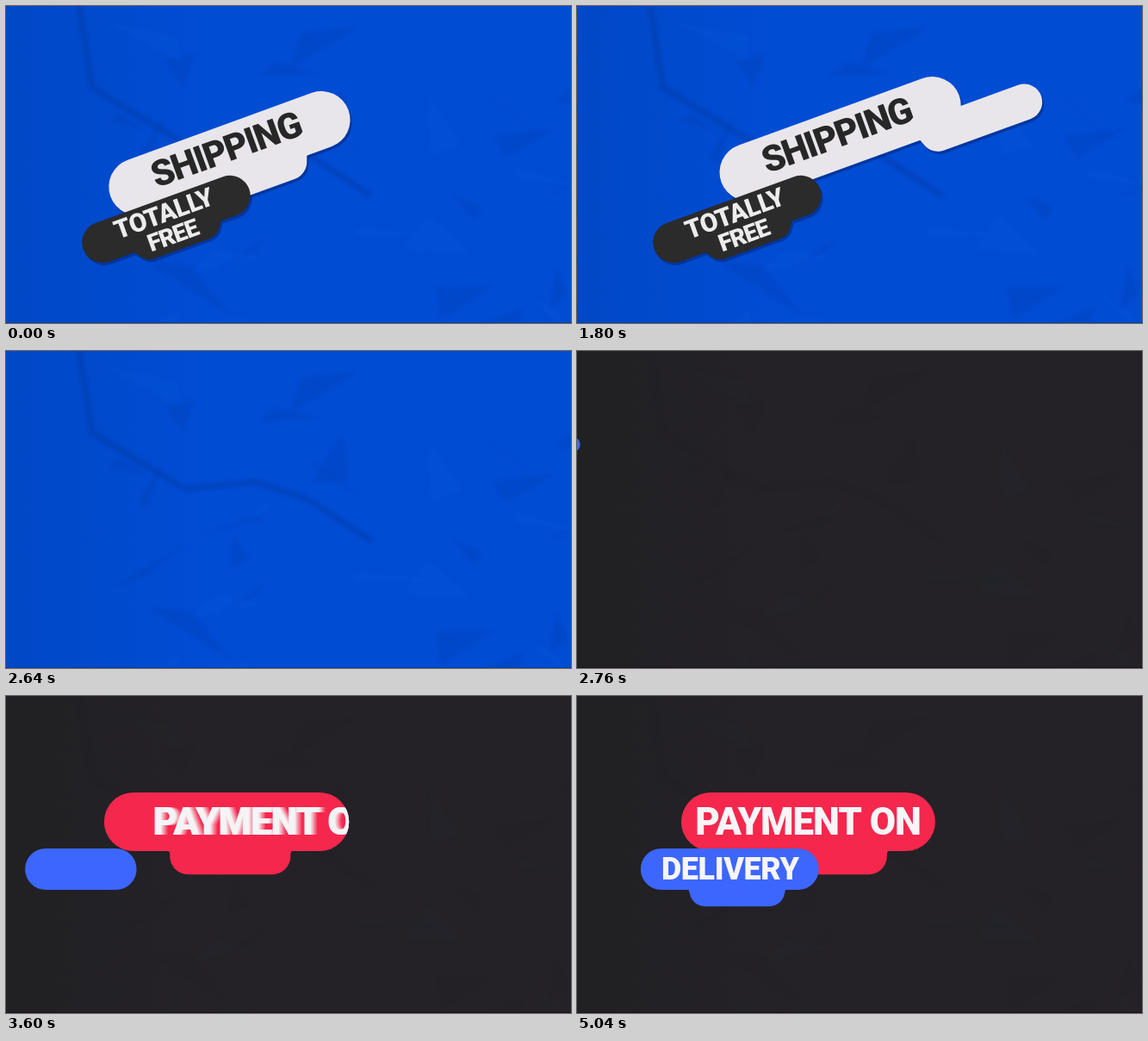
Write an HTML page with a canvas that moves like this. It is 656 px wide and 368 px high and loops after 5520 ms.

```html
<!DOCTYPE html>
<html lang="en">
<head>
<meta charset="utf-8">
<title>Shipping totally free</title>
<style>
html, body { margin: 0; width: 100%; height: 100%; overflow: hidden; background: #004bd2; }
canvas { display: block; }
</style>
</head>
<body>
<canvas id="stage" width="656" height="368"></canvas>
<script>
const W = 656, H = 368, LOOP = 5520, STEP = 120, CUT = 2760;
const RED = '#f5274d', BLUE = '#3d66ff';
const ctx = document.getElementById('stage').getContext('2d');

function seeded(seed) {
  return () => (seed = seed * 16807 % 2147483647) / 2147483647;
}

// Creased paper: faint random facets and one long fold over a gentle gradient.
function makePaper(side, middle, edge, strength) {
  const canvas = document.createElement('canvas');
  canvas.width = W;
  canvas.height = H;
  const c = canvas.getContext('2d'), random = seeded(41);
  const fade = c.createLinearGradient(0, 0, W, 0);
  fade.addColorStop(0, side);
  fade.addColorStop(.35, middle);
  fade.addColorStop(1, middle);
  c.fillStyle = fade;
  c.fillRect(0, 0, W, H);
  c.filter = 'blur(2px)';
  for (let i = 0; i < 36; i++) {
    const x = random() * W, y = random() * H;
    c.fillStyle = i % 3 ? `rgba(0,10,40,${.05 * strength})` : `rgba(40,130,255,${.06 * strength})`;
    c.beginPath();
    for (let k = 0; k < 3; k++) c.lineTo(x + random() * 110, y + random() * 80);
    c.fill();
  }
  c.strokeStyle = `rgba(0,10,40,${.13 * strength})`;
  c.lineWidth = 6;
  c.beginPath();
  for (const [x, y] of [[85, 0], [100, 95], [208, 160], [290, 152], [350, 172], [424, 220]]) c.lineTo(x, y);
  c.stroke();
  c.filter = 'none';
  c.fillStyle = edge;
  c.fillRect(0, H - 1, W, 1);
  return canvas;
}
const bluePaper = makePaper('#0048c6', '#004cd3', '#0040a8', 1);
const darkPaper = makePaper('#212023', '#242227', '#1b1017', .2);

// A pill with a rounded lobe from left to right hanging below it, joined by fillets.
function badge(x, y, w, h, left, right, bottom) {
  const path = new Path2D(), f = 5, base = y + h - 1, r = h * .18 + 9;
  path.roundRect(x, y, w, h, h / 2);
  if (right - left < 4) return path;
  path.roundRect(left, bottom - 2 * r, right - left, 2 * r, r);
  if (left - f > x + h / 2) {
    path.moveTo(left - f, base);
    path.lineTo(left + 2, base);
    path.lineTo(left + 2, base + f);
    path.lineTo(left, base + f);
    path.quadraticCurveTo(left, base, left - f, base);
  }
  if (right + f < x + w - h / 2) {
    path.moveTo(right - 2, base);
    path.lineTo(right + f, base);
    path.quadraticCurveTo(right, base, right, base + f);
    path.lineTo(right - 2, base + f);
    path.closePath();
  }
  return path;
}

function label(text, x, y, size, spacing, color) {
  ctx.font = `900 ${size}px Roboto, sans-serif`;
  ctx.letterSpacing = spacing + 'px';
  ctx.textAlign = 'center';
  ctx.fillStyle = color;
  ctx.fillText(text, x + spacing / 2, y + size * .3555);
}

// Tilted badges: the lobe slides out first, the pill follows with its text.
const tilted = [
  { x: 259.5, y: 171, w: 294, h: 66.5, start: 1500, fill: '#e8e6ea', ink: '#272727',
    lines: [['SHIPPING', -1.6, -6, 42, -1.5]] },
  { x: 186, y: 247.4, w: 205, h: 47.5, start: 1980, fill: '#2b2b2b', ink: '#ececec',
    lines: [['TOTALLY', -.4, -7.6, 30, -.4], ['FREE', 1.2, 20, 28, -1.2]] }
];

function drawTilted(b, t, shadow) {
  const age = Math.max(0, t - b.start), left = -b.w / 2, top = -b.h / 2;
  const slide = 900 * (Math.max(0, age - 150) / 480) ** 2.5;
  const lead = Math.max(slide, 66 * (age / 180) ** 2.2);
  const path = badge(left + slide, top, b.w, b.h,
    left + b.w * .275 + lead, left + b.w * .78 + lead, top + b.h * 1.31);
  ctx.save();
  ctx.translate(b.x + (shadow ? 2 : 0), b.y + (shadow ? 3 : 0));
  ctx.rotate(-Math.PI / 9);
  ctx.fillStyle = shadow ? 'rgba(0,40,130,.6)' : b.fill;
  ctx.fill(path);
  if (!shadow) {
    ctx.clip(path);
    for (const [text, x, y, size, spacing] of b.lines) label(text, x + slide, y, size, spacing, b.ink);
  }
  ctx.restore();
}

// Level badges: every part eases to its place, losing 40% of the way left per step.
const level = [
  { x: 121, y: 112, w: 295, h: 68, start: 3120, fill: RED, text: 'PAYMENT ON', size: 44, spacing: -1.1 },
  { x: 74, y: 177, w: 207, h: 48, start: 3670, fill: BLUE, text: 'DELIVERY', size: 36, spacing: -.4 }
];

function drawLevel(b, t) {
  const n = (t - b.start) / STEP;
  if (n < -2) return;
  const rest = b.w * .6 ** n;
  const path = badge(b.x - .186 * rest, b.y, Math.max(b.h, b.w - .278 * rest), b.h,
    b.x + b.w * .275 - .31 * rest, b.x + b.w * .81 - .773 * rest, b.y + b.h * 1.4);
  ctx.save();
  ctx.fillStyle = b.fill;
  ctx.fill(path);
  ctx.clip(path);
  // Averaged copies give the sliding text its motion blur.
  const offset = .966 * rest, copies = offset > 4 ? 7 : 1;
  for (let i = 0; i < copies; i++) {
    ctx.globalAlpha = 1 / (i + 1);
    const smear = copies > 1 ? (i / (copies - 1) - .5) * offset * .2 : 0;
    label(b.text, b.x + b.w / 2 + offset + smear, b.y + b.h * .49, b.size, b.spacing, '#f7f5f7');
  }
  ctx.restore();
}

function drawBars(t) {
  const n = (t - 3120) / STEP, w = 88.5 * Math.min(1, 1 - n / 3);
  if (w <= 0) return;
  const bar = (x, y, color) => {
    ctx.fillStyle = color;
    ctx.beginPath();
    ctx.roundRect(x, y, w, 17.5, 8.75);
    ctx.fill();
  };
  bar(350 - 125 * .66 ** n, 99.8, BLUE);
  bar(115 + 179.5 * .6 ** n, 212.2, RED);
}

function draw(now) {
  const t = Math.floor(now % LOOP / STEP) * STEP;
  if (t < CUT) {
    ctx.drawImage(bluePaper, 0, 0);
    for (const shadow of [true, false]) tilted.forEach(b => drawTilted(b, t, shadow));
  } else {
    ctx.drawImage(darkPaper, 0, 0);
    level.forEach(b => drawLevel(b, t));
    drawBars(t);
  }
  requestAnimationFrame(draw);
}
draw(performance.now());
</script>
</body>
</html>
```
